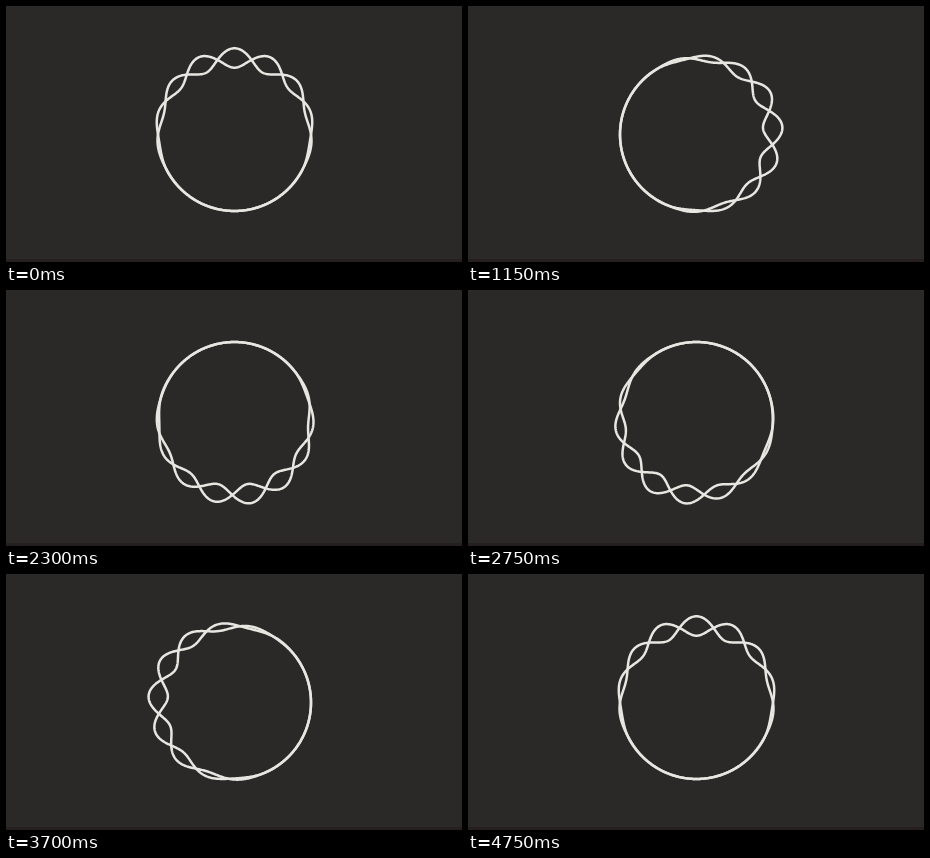
An HTML page with a canvas that plays this animation: 456 by 256 pixels, repeating every 4.8 s.

```html
<!DOCTYPE html>
<html lang="en">
<head>
<meta charset="utf-8">
<title>Braided ring</title>
<style>
  html, body { margin: 0; width: 100%; height: 100%; overflow: hidden; background: #2a2928; }
  canvas { display: block; width: 456px; height: 256px; }
</style>
</head>
<body>
<canvas id="stage" width="456" height="256"></canvas>
<script>
const ctx = document.getElementById('stage').getContext('2d');
const LOOP = 4800, STEP = 50, HOLD = 50;
const CX = 228.5, CY = 128.5, RADIUS = 76.5, AMP = 9.7, WAVES = 7;
const TAU = Math.PI * 2;

// The bump travels clockwise while the wave drifts slowly backwards.
function strand(p, sign) {
  const n = 540;
  ctx.beginPath();
  for (let i = 0; i < n; i++) {
    const a = i / n * TAU;
    const swell = Math.abs(Math.cos((a - p * TAU) / 2)) ** 5;
    const r = RADIUS + sign * AMP * swell * Math.cos(WAVES * a + 3 * Math.PI * p);
    ctx.lineTo(CX + r * Math.sin(a), CY - r * Math.cos(a));
  }
  ctx.closePath();
  ctx.stroke();
}

function draw(ms) {
  const t = Math.floor(ms % LOOP / STEP) * STEP;
  const p = Math.max(0, t - HOLD) / (LOOP - STEP - HOLD);
  ctx.fillStyle = '#2a2928';
  ctx.fillRect(0, 0, 456, 256);
  ctx.fillStyle = '#261f20';
  ctx.fillRect(0, 253, 456, 3);
  ctx.strokeStyle = '#e8e6e1';
  ctx.lineWidth = 2.5;
  ctx.lineJoin = 'round';
  strand(p, 1);
  strand(p, -1);
}

const start = performance.now();
function tick() {
  draw(performance.now() - start);
  requestAnimationFrame(tick);
}
tick();
</script>
</body>
</html>
```
